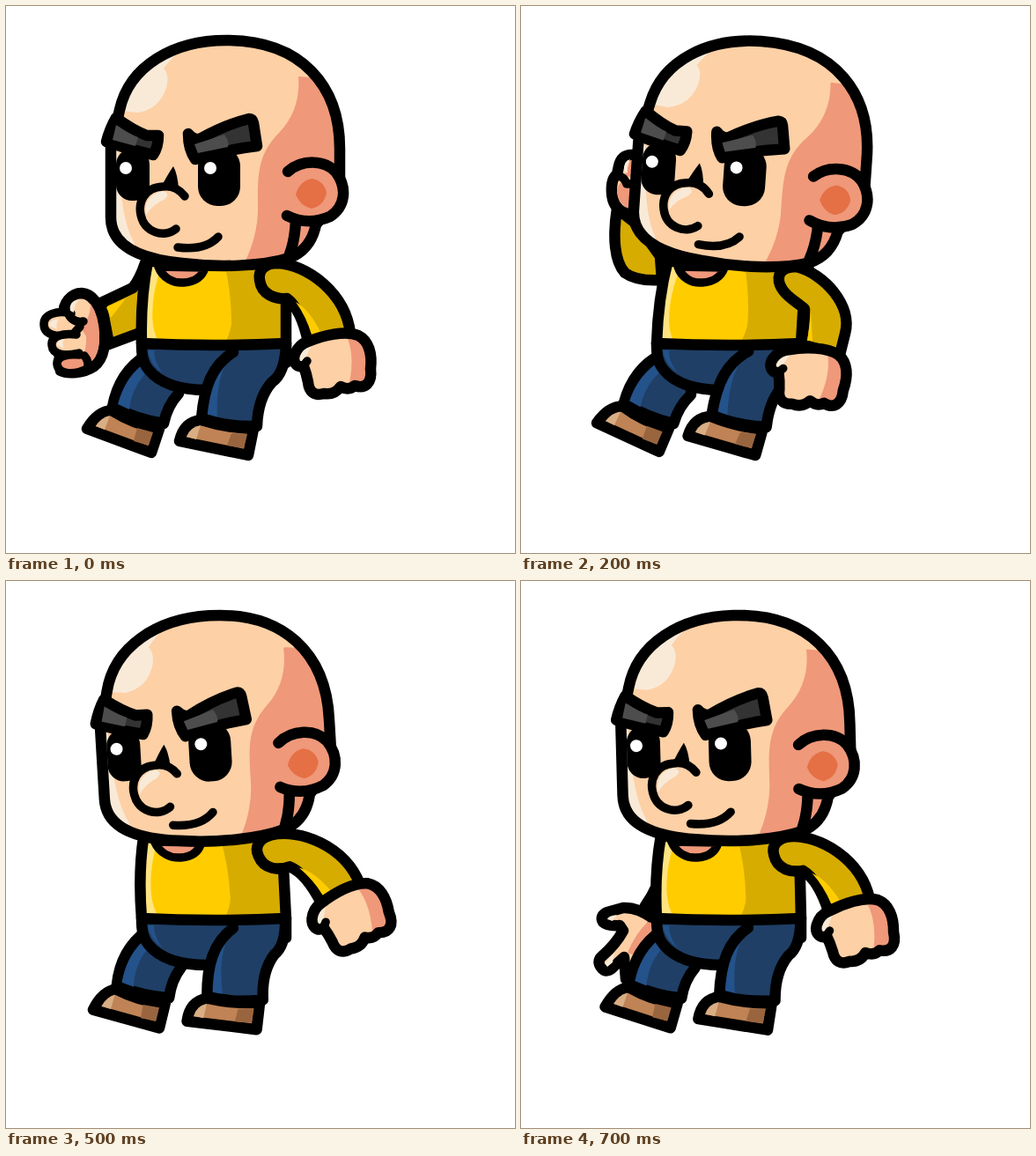
Write an HTML page that moves like this. It is 578 px wide and 621 px high and loops after 0.8 s.

```html
<!DOCTYPE html>
<html lang="en">
<head>
<meta charset="utf-8">
<title>Throwing man</title>
<style>
html, body { margin: 0; width: 100%; height: 100%; overflow: hidden; background: #fff; }
svg { display: block; width: 100%; height: 100%; animation: pose 800ms step-end infinite; }

/* pose number; lean, near arm, wrist and legs in degrees; pull shortens the near arm in px */
@keyframes pose {
  0%    { --pose: 0; --lean: 0;    --arm: 0;   --wrist: 0;   --leg: 0;    --pull: 0; }
  12.5% { --pose: 1; --lean: 2.2;  --arm: 13;  --wrist: -4;  --leg: 2.3;  --pull: 2; }
  25%   { --pose: 2; --lean: 4;    --arm: 29;  --wrist: -16; --leg: 4.4;  --pull: 10; }
  37.5% { --pose: 3; --lean: .7;   --arm: 4;   --wrist: 0;   --leg: 0;    --pull: 0; }
  50%   { --pose: 4; --lean: -2.8; --arm: -14; --wrist: -1;  --leg: -4.6; --pull: 0; }
  62.5% { --pose: 5; --lean: -3.4; --arm: -15; --wrist: -1;  --leg: -4.8; --pull: 0; }
  75%   { --pose: 6; --lean: -3.1; --arm: -12; --wrist: 0;   --leg: -4.6; --pull: 0; }
  87.5%, 100% { --pose: 7; --lean: -1.6; --arm: -6; --wrist: 0; --leg: -2.5; --pull: 0; }
}

.only, .except { --gap: max(var(--pose) - var(--i), var(--i) - var(--pose)); }
.only { opacity: calc(1 - var(--gap)); }
.except { opacity: calc(var(--gap)); }

.head { transform-origin: 246px 364px; transform: rotate(calc(var(--lean) * 1deg)); }
.torso { transform-origin: 236px 384px; transform: skewX(calc(var(--lean) * -.85deg)); }
.arm { transform-origin: 305px 312px;
  transform: translate(calc(var(--lean) * .5px), calc(var(--lean) * 1px)) rotate(calc(var(--arm) * 1deg)); }
.hand { transform-origin: 362px 378px;
  transform: translate(calc(var(--pull) * -.65px), calc(var(--pull) * -.76px)) rotate(calc(var(--wrist) * 1deg)); }
.leg { transform: rotate(calc(var(--leg) * 1deg)); }
.far { transform-origin: 175px 400px; }
.near { transform-origin: 270px 395px; }

.line { stroke: #000; stroke-width: 12.5; stroke-linejoin: round; stroke-linecap: round; }
.thin { stroke-width: 9.5; }
.open { fill: none; }
.skin { fill: #fdd0a6; } .blush { fill: #ef987a; } .pale { fill: #f9ead8; }
.gold { fill: #fc0; } .ochre { fill: #d6ac00; } .lemon { fill: #ffe480; }
.navy { fill: #1f3f66; } .blue { fill: #24528a; }
.shoe { fill: #bf8355; } .heel { fill: #99653f; } .toe { fill: #d9ae84; }
.brow { fill: #333; } .grey { fill: #4d4d4d; }
</style>
</head>
<body>
<svg viewBox="0 0 578 621">
<defs>
  <path id="skull" d="M119 160C123 145 126 131 129 118C140 68 190 39 250 39C335 39 380 90 379 165V215L352 248C348 268 337 280 322 286C290 296 240 297 200 292C150 287 119 272 119 240Z"/>
  <clipPath id="skullClip"><use href="#skull"/></clipPath>
  <path id="palm" d="M343 381C360 374 385 368 400 374C412 380 416 395 414 412C416 428 408 435 396 431Q389 437 380 432Q373 442 361 440C350 443 344 438 343 427Q341 417 338 409C329 411 325 403 328 395C331 388 336 383 343 381Z"/>
  <clipPath id="palmClip"><use href="#palm"/></clipPath>
  <path id="trunk" d="M161 290C155 320 153 350 154 383Q236 387 318 383V320L322 290Z"/>
  <clipPath id="trunkClip"><use href="#trunk"/></clipPath>

  <g id="fist">
    <path class="skin line" d="M66 350C64 338 74 326 86 326C101 327 108 346 111 362C114 380 112 400 100 409C88 417 70 418 62 414L58 360Z"/>
    <path class="blush" d="M96 338Q106 352 106 375Q106 398 95 405Q86 411 82 405Q92 395 91 375L84 364Q96 356 96 338Z"/>
    <path class="skin line thin" d="M74 349C58 345 43 350 43 361C43 373 56 377 76 373L84 364"/>
    <path class="skin line thin" d="M80 373C64 371 51 375 52 385C53 396 66 398 83 394"/>
    <path class="blush line thin" d="M84 396C70 395 57 397 58 407C60 419 78 419 92 412Q95 404 89 397"/>
    <path class="line thin open" d="M69 346Q75 361 88 358"/>
    <path class="pale" d="M49 363Q49 356 60 355Q56 362 58 367ZM58 385Q58 379 66 378Q63 383 66 389ZM73 346Q71 335 83 333Q77 340 77 348Z"/>
  </g>
</defs>

<!-- far arm -->
<g class="only" style="--i:0">
  <path class="ochre line" d="M158 292Q152 310 144 320L108 337L117 384L160 368Z"/>
  <path class="gold" d="M114 342L136 332Q126 345 119 354Z"/>
  <use href="#fist"/>
</g>
<g class="only" style="--i:1">
  <path class="ochre line" d="M165 295Q140 297 98 274L96 322Q130 340 162 340Z"/>
  <path class="gold" d="M102 304Q130 320 154 320V333Q125 332 102 318Z"/>
  <use href="#fist" transform="translate(-19 -80) rotate(20 80 372)"/>
</g>
<g class="only" style="--i:2">
  <path class="ochre line" d="M109 230C104 262 106 290 118 303Q132 313 160 311L158 284L132 248Z"/>
  <path class="skin line" d="M128 169Q114 168 111 182L109 191Q102 196 103 212Q104 228 116 234L140 242V175Z"/>
  <path class="blush" d="M119 197L130 200V232Q112 229 109 212Q108 202 119 197ZM124 175L132 175V195L118 193Z"/>
  <path class="pale" d="M117 187Q116 176 124 174Q120 181 121 190Z"/>
  <path class="line thin open" d="M109 193Q117 193 120 202L132 202"/>
</g>
<g class="only" style="--i:3">
  <path class="ochre line" d="M112 333L160 320V374L113 380Z"/>
  <path class="gold" d="M119 337L149 329Q138 344 120 350Z"/>
  <path class="skin line" d="M75 327Q82 325 80 319Q71 311 74 302Q79 293 89 298Q96 305 102 319Q112 329 114 346C117 368 114 384 104 392Q92 400 72 401L45 405Q35 404 36 396Q37 390 46 389L62 386Q39 386 37 378Q34 368 42 362L61 358L44 349Q33 346 34 337Q36 328 47 329Z"/>
  <path class="blush" d="M108 342Q112 380 100 387Q86 396 52 399Q46 399 48 395L72 388Q99 380 108 342Z"/>
  <path class="line thin open" d="M44 350L62 344Q66 366 66 385L46 388M44 356L61 358"/>
  <path class="pale" d="M40 338Q41 333 50 334L46 343ZM42 372Q43 366 51 364L47 378ZM80 306Q82 300 87 303L84 311Z"/>
</g>
<g class="only" style="--i:4">
  <path class="skin line" d="M280 410L307 413Q321 418 320 431Q315 441 300 438L280 436Z"/>
  <path class="blush" d="M302 420Q314 419 314 430L304 426Z"/>
  <path class="line thin open" d="M296 436Q305 432 310 436"/>
</g>
<g class="only" style="--i:5">
  <path class="skin line" d="M255 405H282Q290 425 278 438H255Z"/>
</g>
<g class="only" style="--i:6">
  <path class="skin line" d="M190 430L188 469Q194 477 202 472Q208 479 222 475L235 462V430Z"/>
  <path class="heel" d="M193 445H201V467Q195 471 193 466Z"/>
  <path class="pale" d="M209 448H214L218 468Q211 470 209 462Z"/>
  <path class="line thin open" d="M204 442L203 470"/>
</g>
<g class="only" style="--i:7">
  <path class="ochre line" d="M162 322Q156 348 141 369L152 386L166 380Z"/>
  <path class="skin line" d="M150 383Q132 370 116 371L98 376Q89 380 93 387Q98 392 112 391L116 397Q108 412 92 426Q85 432 92 440Q98 446 106 437L117 427L119 452L150 430Z"/>
  <path class="blush" d="M144 387Q130 400 121 422L129 425L152 404V389Z"/>
  <path class="pale" d="M98 384Q99 380 109 379L104 386ZM95 434L106 422L104 433L98 438Z"/>
</g>

<!-- legs -->
<g class="leg far">
  <path class="navy line" d="M160 396C140 408 126 428 121 455Q148 469 179 474Q183 454 196 440V410Z"/>
  <path class="blue" d="M153 409Q134 425 127 452L140 458Q143 434 158 418Z"/>
  <path class="shoe line" d="M120 459Q104 460 92 480L165 507L174 480Q145 475 120 459Z"/>
  <path class="heel" d="M149 479L167 484L162 499L145 494Z"/>
  <path class="toe" d="M102 477Q108 467 118 465L112 481Z"/>
</g>
<path class="navy line" d="M154 383C154 395 155 405 162 413C176 430 200 437 235 436L318 405V383Z"/>
<path class="blue" d="M161 391H168Q168 404 178 417Q163 406 161 391Z"/>
<g class="leg near">
  <path class="navy" d="M258 393C234 408 225 432 222 468Q250 478 285 477Q286 445 302 427Q317 417 318 384Z"/>
  <path class="blue" d="M250 406Q230 425 228 465L240 469Q238 428 250 406Z"/>
  <path class="line open" d="M258 393C234 408 225 432 222 468Q250 478 285 477Q286 445 302 427Q317 417 318 384"/>
  <path class="shoe line" d="M222 470Q202 472 197 494L275 510L281 480Q250 479 222 470Z"/>
  <path class="heel" d="M256 485L274 486L270 502L251 499Z"/>
  <path class="toe" d="M205 489Q209 478 221 476L216 492Z"/>
</g>

<g class="torso">
  <use href="#trunk" class="gold"/>
  <g clip-path="url(#trunkClip)">
    <path class="ochre" d="M246 285Q256 320 256 360Q255 374 244 390H325V285Z"/>
    <path class="lemon" d="M150 285H180Q163 330 167 362Q169 376 178 390H150Z"/>
  </g>
  <path class="blush line thin" d="M173 296C178 309 190 315 202 314C215 313 223 307 226 297Z"/>
  <use href="#trunk" class="line open"/>
</g>

<g class="head">
  <use href="#skull" class="skin"/>
  <g clip-path="url(#skullClip)">
    <path class="blush" d="M332 80Q335 118 310 144C284 170 286 195 286 235Q284 270 266 300H400V100Q360 80 332 80Z"/>
    <path class="pale" d="M122 118Q134 80 186 52L205 45Q188 58 179 71Q186 78 182 93Q174 117 150 121ZM115 165H127Q130 240 144 266L152 285L115 270Z"/>
  </g>
  <use href="#skull" class="line open"/>
  <path class="blush line" d="M320 188C336 174 362 174 375 189C388 207 385 228 368 239C352 246 335 246 319 238"/>
  <path d="M329 214Q333 199 347 196Q361 198 364 212Q361 227 347 230Q334 227 329 214Z" fill="#e57045"/>
  <path class="line open" d="M329 244Q328 266 322 282"/>
  <rect x="125" y="162" width="38" height="59" rx="18"/>
  <rect x="218" y="160" width="48" height="67" rx="22"/>
  <circle cx="136" cy="184" r="7" fill="#fff"/>
  <circle cx="232" cy="184" r="7" fill="#fff"/>
  <path d="M190 182Q183 192 176 206L196 208Q195 191 190 182Z"/>
  <path class="skin" d="M203 214Q185 201 169 207C149 217 149 246 163 255Q180 264 194 254Z"/>
  <path class="pale" d="M159 237Q156 215 178 210Q188 213 179 220Q166 226 159 237Z"/>
  <path class="line thin open" d="M203 216Q193 203 178 205C157 206 150 223 153 237C157 257 179 264 193 253"/>
  <path class="line thin open" d="M195 274Q226 278 241 262"/>
  <path class="brow line" d="M125 127Q144 141 160 147L173 147Q173 160 167 169Q140 163 114 154Q118 139 125 127Z"/>
  <path class="grey" d="M125 135Q139 145 150 149L147 159L121 152Z"/>
  <path class="brow line" d="M207 145Q213 152 220 151Q248 135 276 128Q280 128 281 133L285 159Q250 163 215 174Q207 163 207 145Z"/>
  <path class="grey" d="M214 157L248 146Q254 154 252 160L218 167Z"/>
</g>

<!-- near arm -->
<g class="only" style="--i:2">
  <path class="ochre line" d="M293 313C291 301 300 296 313 296C344 304 377 340 368 372L362 396L318 384Q322 362 322 344C312 335 296 327 293 313Z"/>
  <path class="gold" d="M329 347Q330 362 331 380L325 380Q328 362 329 347Z"/>
</g>
<g class="arm">
  <g class="except" style="--i:2">
    <path class="ochre line" d="M288 311C286 299 295 292 308 292C342 293 386 326 391 372L343 381C338 358 331 341 319 332C306 333 290 328 288 311Z"/>
    <path class="gold" d="M329 336Q344 344 357 370L347 373Q341 353 329 336Z"/>
  </g>
  <g class="hand">
    <use href="#palm" class="skin"/>
    <g clip-path="url(#palmClip)">
      <path class="blush" d="M387 375Q398 400 387 440H425V370Z"/>
      <path class="pale" d="M325 400Q330 384 352 380Q342 390 338 408Z"/>
    </g>
    <use href="#palm" class="line open"/>
    <path class="line thin open" d="M338 408L342 403"/>
  </g>
</g>
</svg>
</body>
</html>
```
